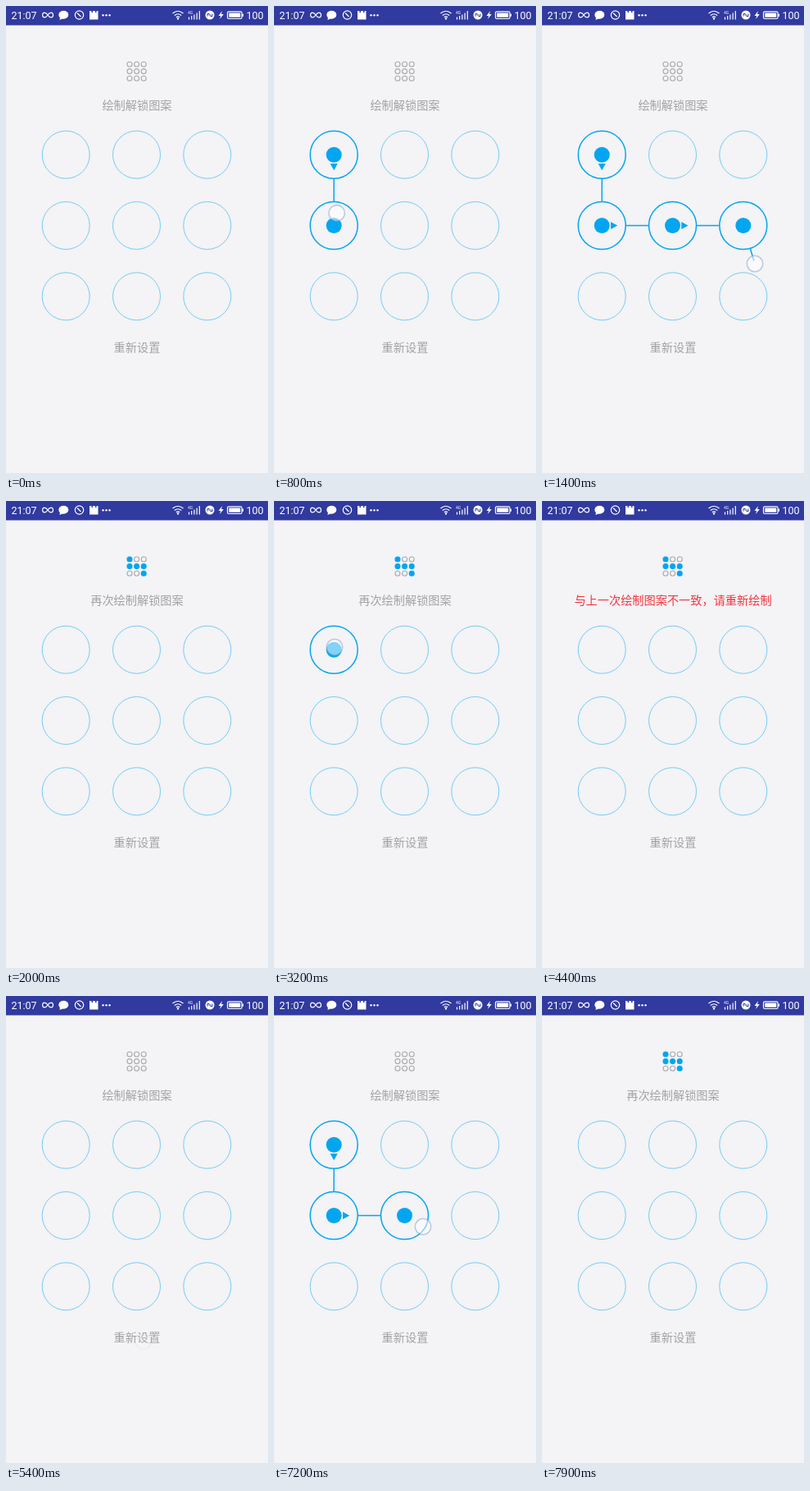
Animation, 320 px wide and 569 px high, one loop 8 s. Source, as an HTML page:

```html
<!DOCTYPE html>
<html lang="zh-CN">
<head>
<meta charset="utf-8">
<title>Pattern lock</title>
<style>
  html, body { margin: 0; width: 100%; height: 100%; overflow: hidden; background: #f4f3f6; }
  svg { display: block; width: 100%; height: 100%; }
  .zh { font: 14.2px "Noto Sans CJK SC", "Noto Sans CJK", sans-serif; fill: #a2a2a4; text-anchor: middle; }
  .bar { font: 12.5px Roboto, sans-serif; fill: #fff; }
  .line { fill: none; stroke: #fff; stroke-width: 1.2; }
  .solid { fill: #fff; }
  .mini circle { fill: none; stroke: #a9a9ab; stroke-width: 1.1; }
  .mini .on { fill: #02a6f0; stroke: #02a6f0; }
  .ring { fill: none; stroke: #72cdf3; stroke-width: 1; }
  .on .ring { stroke: var(--ink); stroke-width: 1.5; }
  .dot, .arrow { fill: var(--ink); visibility: hidden; }
  .on .dot, .on.linked .arrow { visibility: visible; }
  #links { fill: none; stroke: var(--ink); stroke-width: 1.5; }
  #stage { --ink: #02a6f0; }
  #stage.wrong { --ink: #f3323b; }
  #finger circle { fill: #fff; fill-opacity: .5; stroke: #8ea6c4; stroke-opacity: .55; stroke-width: 1.6; }
</style>
</head>
<body>
<svg id="stage" viewBox="0 0 320 569" preserveAspectRatio="none">
  <rect width="320" height="569" fill="#f4f3f6"/>
  <rect width="320" height="23.5" fill="#303a9f"/>

  <!-- status bar -->
  <text class="bar" x="6.5" y="15.5">21:07</text>
  <path class="line" stroke-width="1.5" d="M51 11C48.500 7 44.600 7.300 44.600 11S48.500 15 51 11S57.500 7.300 57.500 11S53.500 15 51 11Z"/>
  <ellipse class="solid" cx="70.300" cy="10.700" rx="6" ry="5"/>
  <path class="solid" d="M66 13L65.500 17L70 15Z"/>
  <circle class="line" cx="89.500" cy="11" r="5.200"/>
  <path class="line" d="M87 8.500L91.500 13"/>
  <path class="solid" d="M102 6H104.500V8H106V6H109V8H110.500V6H112.500V16.500H102Z"/>
  <g class="solid">
    <circle cx="118.500" cy="11.300" r="1.200"/><circle cx="122.500" cy="11.300" r="1.200"/><circle cx="126.500" cy="11.300" r="1.200"/>
  </g>
  <path class="line" d="M203.500 9Q210 3.500 216.500 9M205.800 11.500Q210 8 214.200 11.500M207.900 13.800Q210 12 212.100 13.800"/>
  <circle class="solid" cx="210" cy="15.400" r="1.200"/>
  <text class="bar" x="222" y="10" style="font-size:5px">4G</text>
  <path class="line" d="M223.500 16.500V13.500M226.700 16.500V12M229.900 16.500V10.500M233.100 16.500V8.500M236.300 16.500V6"/>
  <circle class="solid" cx="249" cy="11" r="5.500"/>
  <path d="M246 12.500V9.500H248.500M249.500 12.500H252V9.500M247.500 11H250.500" fill="none" stroke="#303a9f"/>
  <path class="solid" d="M264 6L259.500 12H262.300L261 16L265.800 10H263Z"/>
  <rect class="line" x="270.500" y="6.800" width="17.500" height="8.700" rx="1.500"/>
  <path class="solid" d="M272.300 8.600H286.200V13.700H272.300ZM288.500 9.500H290V12.800H288.500Z"/>
  <text class="bar" x="293.500" y="15.500">100</text>

  <g id="mini" class="mini"></g>
  <text id="label" class="zh" x="160" y="126"></text>
  <path id="links"/>
  <g id="nodes"></g>
  <text class="zh" x="160" y="421">重新设置</text>
  <g id="finger"><circle r="9.700"/></g>
</svg>
<script>
const LOOP = 8000, STEP = 100, R = 29;
const $ = id => document.getElementById(id);
const TEXT = {
  first: '绘制解锁图案',
  again: '再次绘制解锁图案',
  wrong: '与上一次绘制图案不一致，请重新绘制'
};
const SAVED = [0, 3, 4, 5, 8];

// Each gesture: time of lift, time of clearing, waypoints [ms, x, y]
const gestures = [
  { lift: 1900, clear: 1900, path: [[500, 75, 178], [700, 74, 225], [850, 78, 266], [1100, 160, 271],
    [1300, 240, 272], [1350, 256, 290], [1400, 260, 314], [1550, 252, 352], [1800, 249, 384]] },
  { lift: 3900, clear: 4400, path: [[3200, 74, 178], [3400, 75, 255], [3450, 84, 268], [3600, 160, 274],
    [3750, 250, 274], [3800, 256, 275]] },
  { lift: 7800, clear: 7800, path: [[6800, 74, 178], [7000, 75, 255], [7050, 90, 270], [7200, 182, 281],
    [7350, 240, 276], [7400, 256, 285], [7500, 258, 318], [7600, 250, 352], [7700, 248, 368]] }
];

const grid = (x, y, gap) => Array.from({ length: 9 }, (_, i) =>
  ({ x: x + i % 3 * gap, y: y + Math.floor(i / 3) * gap }));
const centres = grid(73.2, 181.2, 86.3);

$('mini').innerHTML = grid(151, 71, 8.6)
  .map(p => `<circle cx="${p.x}" cy="${p.y}" r="3"/>`).join('');
$('nodes').innerHTML = centres.map(p => `<g transform="translate(${p.x} ${p.y})">
  <circle class="ring" r="${R}"/><circle class="dot" r="9.5"/>
  <path class="arrow" d="M10.800 -4.500L19 0L10.800 4.500Z"/></g>`).join('');
const minis = [...$('mini').children], nodes = [...$('nodes').children];

function pointAt(path, t) {
  const last = path[path.length - 1];
  if (t >= last[0]) return { x: last[1], y: last[2] };
  const i = path.findIndex(p => p[0] > t);
  const [a, b] = [path[i - 1], path[i]];
  const k = (t - a[0]) / (b[0] - a[0]);
  return { x: a[1] + (b[1] - a[1]) * k, y: a[2] + (b[2] - a[2]) * k };
}

function visited(path, t) {
  const hits = [];
  for (let s = path[0][0]; s <= t; s += 10) {
    const p = pointAt(path, s);
    const i = centres.findIndex(c => Math.hypot(c.x - p.x, c.y - p.y) < R);
    if (i >= 0 && !hits.includes(i)) hits.push(i);
  }
  return hits;
}

// Segment that starts on a ring and stops short of the end point
function link(a, b, trim) {
  const dx = b.x - a.x, dy = b.y - a.y, d = Math.hypot(dx, dy);
  if (d <= R + trim) return '';
  const at = k => `${a.x + dx * k / d} ${a.y + dy * k / d}`;
  return `M${at(R)}L${at(d - trim)}`;
}

function showFinger(p, opacity) {
  $('finger').setAttribute('opacity', p ? opacity : 0);
  if (p) $('finger').setAttribute('transform', `translate(${p.x} ${p.y})`);
}

function render(t) {
  const g = gestures.find(g => t >= g.path[0][0] && t < g.clear);
  const hits = g ? visited(g.path, Math.min(t, g.lift)) : [];
  const touch = g && t < g.lift ? pointAt(g.path, t) : null;

  nodes.forEach((n, i) => {
    const k = hits.indexOf(i), next = centres[hits[k + 1]];
    const linked = k >= 0 && next;
    n.setAttribute('class', (k >= 0 ? 'on' : '') + (linked ? ' linked' : ''));
    if (linked) {
      const angle = Math.atan2(next.y - centres[i].y, next.x - centres[i].x) * 180 / Math.PI;
      n.lastElementChild.setAttribute('transform', `rotate(${angle})`);
    }
  });
  let d = hits.slice(1).map((h, k) => link(centres[hits[k]], centres[h], R)).join('');
  if (touch && hits.length) d += link(centres[hits[hits.length - 1]], touch, 4);
  $('links').setAttribute('d', d);
  $('stage').setAttribute('class', g && t >= g.lift ? 'wrong' : '');

  const saved = t >= 1900 && t < 5300 || t >= 7800;
  minis.forEach((m, i) => m.setAttribute('class', saved && SAVED.includes(i) ? 'on' : ''));
  const mistaken = t >= 3900 && t < 5300;
  $('label').textContent = TEXT[mistaken ? 'wrong' : saved ? 'again' : 'first'];
  $('label').style.fill = mistaken ? '#f4333c' : '';

  // The tap on the reset button leaves a faint mark
  const tap = t >= 5200 && t < 6800;
  if (tap) showFinger({ x: 167.5, y: 420.5 }, t < 5300 ? 1 : 0.16);
  else showFinger(touch, 1);
}

const start = performance.now();
let shown = -1;
function tick() {
  const t = Math.floor((performance.now() - start) % LOOP / STEP) * STEP;
  if (t !== shown) render(shown = t);
  requestAnimationFrame(tick);
}
tick();
</script>
</body>
</html>
```
